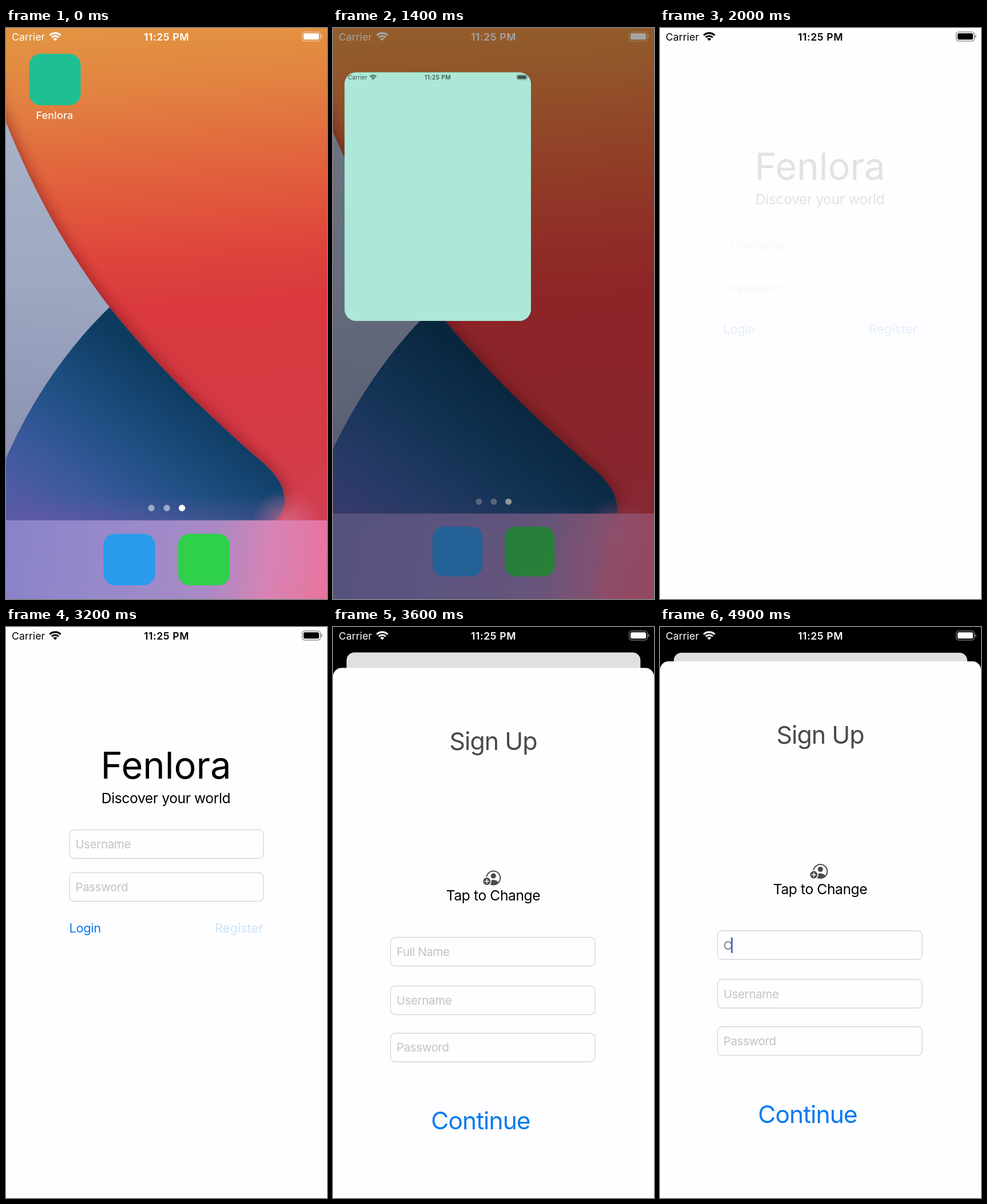
Recreate the animation shown at these times as an HTML page with a canvas. Size 561 px wide and 998 px high, loop 5100 ms.

```html
<!DOCTYPE html>
<html lang="en">
<head>
<meta charset="utf-8">
<title>App sign-up</title>
<style>
  html, body { margin: 0; width: 100%; height: 100%; overflow: hidden; background: #000; }
  canvas { display: block; width: 561px; height: 998px; }
</style>
</head>
<body>
<canvas id="stage" width="561" height="998"></canvas>
<script>
const ctx = document.getElementById('stage').getContext('2d');
const W = 561, H = 998, LOOP = 5100, STEP = 100;
const PAPER = '#fefdff', BLUE = '#047bee', DARK = '#4a4a4d';
const APP_NAME = 'Fenlora', APP_COLOR = '#1fbf93';
const ICON = { x: 40.5, y: 45, size: 90 };

const clamp = v => Math.max(0, Math.min(1, v));
const mix = (a, b, k) => a + (b - a) * k;

// Run a drawing function in its own state, faded by alpha.
function group(draw, alpha = 1) {
  ctx.save();
  ctx.globalAlpha *= alpha;
  draw();
  ctx.restore();
}

function zoom(scale) {
  ctx.translate(W / 2, H / 2);
  ctx.scale(scale, scale);
  ctx.translate(-W / 2, -H / 2);
}

function text(str, x, y, size, color, { align = 'left', weight = 400, spacing = -0.016 } = {}) {
  ctx.font = `${weight} ${size}px Inter, sans-serif`;
  ctx.letterSpacing = `${spacing * size}px`;
  ctx.textAlign = align;
  ctx.fillStyle = color;
  ctx.fillText(str, x, y);
}

function roundRect(x, y, w, h, r) {
  ctx.beginPath();
  ctx.roundRect(x, y, w, h, r);
}

function box(x, y, w, h, r, color) {
  roundRect(x, y, w, h, r);
  ctx.fillStyle = color;
  ctx.fill();
}

function disc(x, y, r, color) {
  ctx.beginPath();
  ctx.arc(x, y, r, 0, 2 * Math.PI);
  ctx.fillStyle = color;
  ctx.fill();
}

function withStops(g, stops) {
  stops.forEach(([at, color]) => g.addColorStop(at, color));
  return g;
}

const gradient = (x0, y0, x1, y1, stops) => withStops(ctx.createLinearGradient(x0, y0, x1, y1), stops);

function statusBar(color) {
  text('Carrier', 10, 22, 17.6, color, { spacing: 0.005 });
  text('11:25 PM', W / 2, 22, 17.6, color, { align: 'center', weight: 600, spacing: 0.035 });

  // Wi-Fi fan
  const [from, to] = [-0.75 * Math.PI, -0.25 * Math.PI];
  ctx.strokeStyle = ctx.fillStyle = color;
  ctx.lineWidth = 3.1;
  for (const r of [8.5, 13.6]) {
    ctx.beginPath();
    ctx.arc(86, 22.5, r, from, to);
    ctx.stroke();
  }
  ctx.beginPath();
  ctx.moveTo(86, 22.5);
  ctx.arc(86, 22.5, 5, from, to);
  ctx.fill();

  // Battery
  box(520, 9.3, 27, 11, 2.5, color);
  group(() => {
    roundRect(517.6, 6.8, 31.8, 16, 4.5);
    ctx.lineWidth = 1.3;
    ctx.stroke();
    box(550.6, 12.3, 1.8, 5, 1, color);
  }, 0.5);
}

function wallpaper() {
  ctx.fillStyle = gradient(240, 0, 310, H, [
    [0, '#e29342'], [0.1, '#e28441'], [0.25, '#e1633d'], [0.4, '#df443c'],
    [0.5, '#d9383e'], [0.75, '#d43a45'], [1, '#cc4360']]);
  ctx.fillRect(-40, -40, W + 80, H + 80);

  // Left side, with a shadow falling on the red
  const edge = () => {
    ctx.bezierCurveTo(265, 593, 352, 675, 447, 758);
    ctx.bezierCurveTo(494, 797, 497, 838, 470, 862);
    ctx.lineTo(430, 1040);
    ctx.lineTo(-60, 1040);
  };
  group(() => {
    ctx.beginPath();
    ctx.moveTo(-60, -20);
    ctx.lineTo(-50, 10);
    ctx.bezierCurveTo(-35, 65, -20, 115, 0, 165);
    ctx.bezierCurveTo(50, 290, 108, 392, 181, 488);
    edge();
    ctx.closePath();
    ctx.shadowColor = 'rgba(110,12,22,.7)';
    ctx.shadowBlur = 28;
    ctx.fillStyle = gradient(40, 160, 0, 750, [[0, '#a9b4c9'], [0.5, '#9ca7c1'], [1, '#8c91b1']]);
    ctx.fill();
  });

  // Blue hill
  ctx.beginPath();
  ctx.moveTo(-60, 900);
  ctx.bezierCurveTo(-40, 850, -22, 800, 0, 752);
  ctx.bezierCurveTo(45, 650, 108, 558, 181, 488);
  edge();
  ctx.closePath();
  ctx.fillStyle = gradient(330, 640, 130, 900, [
    [0, '#0d3b60'], [0.4, '#1d4f82'], [0.75, '#3a599c'], [1, '#4f5ba5']]);
  ctx.fill();
  ctx.fillStyle = gradient(0, 815, 0, 870, [[0, 'rgba(120,85,160,0)'], [1, 'rgba(120,85,160,.4)']]);
  ctx.fill();

  // Pink glow at the foot of the hill
  ctx.fillStyle = withStops(ctx.createRadialGradient(490, 866, 0, 490, 866, 60),
    [[0, 'rgba(225,115,150,.7)'], [1, 'rgba(225,115,150,0)']]);
  ctx.fillRect(430, 800, 120, 130);
}

function homeItems(pressed, showIcon) {
  ctx.fillStyle = gradient(0, 860, W, 930, [
    [0, '#8983c8'], [0.35, '#9889cb'], [0.65, '#aa89c4'], [0.82, '#d683b4'], [1, '#e8759f']]);
  ctx.fillRect(-40, 860.5, W + 80, 220);
  [254, 281, 307.5].forEach((x, i) => disc(x, 839, 5.7, i < 2 ? 'rgba(255,255,255,.5)' : '#fff'));
  box(170.5, 884, 90, 90, 20, '#2b9bee');
  box(301, 884, 90, 90, 20, '#2fd04a');
  if (showIcon) {
    box(ICON.x, ICON.y, ICON.size, ICON.size, 20, APP_COLOR);
    if (pressed) box(ICON.x, ICON.y, ICON.size, ICON.size, 20, 'rgba(0,0,0,.42)');
  }
  text(APP_NAME, 85, 159, 17.6, '#fff', { align: 'center', weight: 500, spacing: 0.02 });
}

// Home screen; open (0..1) is how far the app has opened over it.
function home(pressed, open) {
  group(() => { zoom(1 + 0.095 * open); wallpaper(); });
  group(() => { zoom(1 - 0.065 * open); homeItems(pressed, open === 0); }, 1 - 0.25 * open);
  statusBar('#fff');
  ctx.fillStyle = `rgba(0,0,0,${0.71 * open})`;
  ctx.fillRect(0, 0, W, H);
}

// App window growing out of its icon.
function launchWindow(open) {
  const w = mix(ICON.size, W, open);
  const h = mix(ICON.size, H, open ** 1.4);
  const x = mix(ICON.x + ICON.size / 2, W / 2, open) - w / 2;
  const y = mix(ICON.y + ICON.size / 2, H / 2, open) - h / 2;
  const r = Math.min(20, (1 - open) * 130);
  box(x, y, w, h, r, APP_COLOR);
  group(() => {
    box(x, y, w, h, r, '#fff');
    ctx.translate(x, y);
    ctx.scale(w / W, w / W);
    statusBar('#000');
  }, clamp(open * 1.25));
}

function field(x, y, w, label) {
  roundRect(x + 0.5, y + 0.5, w, 50, 8);
  ctx.strokeStyle = '#d6d5db';
  ctx.lineWidth = 1.3;
  ctx.stroke();
  text(label, x + 11, y + 33, 20.4, '#c3c2c7');
}

function login(alpha, registerAlpha) {
  group(() => {
    text(APP_NAME, W / 2 - 1, 265, 65, '#000', { align: 'center', spacing: 0 });
    text('Discover your world', W / 2 - 1, 308, 24.6, '#000', { align: 'center' });
    field(110.5, 354, 339, 'Username');
    field(110.5, 429, 339, 'Password');
    text('Login', 110.5, 534, 21.8, BLUE);
    group(() => text('Register', 449.5, 534, 21.8, BLUE, { align: 'right', spacing: 0 }), registerAlpha);
  }, alpha);
}

function addPersonIcon(x, y) {
  ctx.strokeStyle = DARK;
  ctx.lineWidth = 2;
  ctx.beginPath();
  ctx.arc(x, y, 12, 0, 2 * Math.PI);
  ctx.stroke();
  disc(x, y - 3.5, 4.6, DARK);
  group(() => {
    ctx.beginPath();
    ctx.arc(x, y, 12, 0, 2 * Math.PI);
    ctx.clip();
    ctx.beginPath();
    ctx.ellipse(x, y + 10, 9, 6.5, 0, 0, 2 * Math.PI);
    ctx.fillStyle = DARK;
    ctx.fill();
  });
  const bx = x - 11.5, by = y + 6;
  disc(bx, by, 8, PAPER);
  disc(bx, by, 6.4, DARK);
  ctx.fillStyle = PAPER;
  ctx.fillRect(bx - 4, by - 0.8, 8, 1.6);
  ctx.fillRect(bx - 0.8, by - 4, 1.6, 8);
}

function signUp(t) {
  box(0, 60, W, H, 15, PAPER);
  text('Sign Up', W / 2 - 0.5, 204, 43, DARK, { align: 'center', spacing: -0.024 });
  addPersonIcon(280.3, 427);
  text('Tap to Change', W / 2 - 0.5, 467, 24.6, '#000', { align: 'center' });

  const typed = t >= 4900;
  field(100, 530.5, 357.5, typed ? '' : 'Full Name');
  if (typed) text('C', 111, 563.5, 20.4, '#77767b');
  if (t >= 4300) {
    group(() => box(typed ? 124 : 110.5, 542, 3, 28, 1.5, '#3f74da'), t < 4400 ? 0.5 : 1);
  }
  field(100, 615.5, 357.5, 'Username');
  field(100, 698, 357.5, 'Password');
  text('Continue', 258, 867, 42.5, BLUE, { align: 'center', spacing: -0.022 });
}

function app(t) {
  // Critically damped spring lifts the sheet.
  const s = Math.max(0, t - 3250) * 0.0183;
  const lift = 1 - (1 + s) * Math.exp(-s);
  ctx.fillStyle = '#000';
  ctx.fillRect(0, 0, W, H);
  group(() => {
    ctx.translate(24 * lift, 45 * lift);
    ctx.scale(1 - 48 * lift / W, 1 - 48 * lift / W);
    const r = Math.min(15, lift * 60);
    box(0, 0, W, H, r, PAPER);
    login(clamp((t - 1950) / 450), t < 3200 ? 1 : mix(0.2, 1, lift));
    box(0, 0, W, H, r, `rgba(0,0,0,${0.12 * lift})`);
  });
  if (lift > 0) {
    group(() => {
      ctx.translate(0, (H - 60) * (1 - lift));
      signUp(t);
    });
  }
  statusBar(lift > 0.5 ? '#fff' : '#000');
}

function render(t) {
  ctx.clearRect(0, 0, W, H);
  if (t < 2000) {
    const open = t < 1400 ? 0 : 1 - Math.exp(-(t - 1341) / 85);
    home(t >= 1200, open);
    if (open > 0) launchWindow(open);
  } else {
    app(t);
  }
}

const start = performance.now();
function tick() {
  const t = (performance.now() - start) % LOOP;
  render(Math.floor(t / STEP) * STEP);
  requestAnimationFrame(tick);
}
tick();
</script>
</body>
</html>
```
